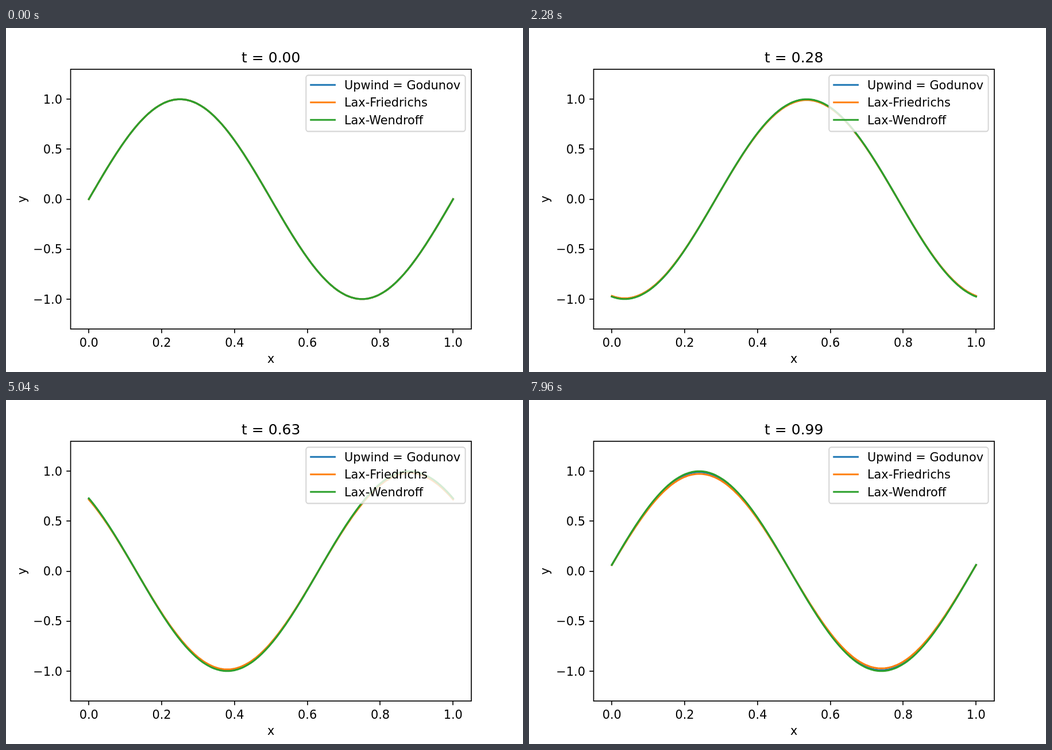
Write an HTML page with a canvas that moves like this. It is 900 px wide and 600 px high and loops after 8 s.

```html
<!DOCTYPE html>
<html lang="en">
<head>
<meta charset="utf-8">
<title>Advection schemes</title>
<style>
  html, body { margin: 0; width: 100%; height: 100%; overflow: hidden; background: #fff; }
  canvas { display: block; width: 900px; height: 600px; }
</style>
</head>
<body>
<canvas id="plot" width="900" height="600"></canvas>
<script>
const ctx = document.getElementById('plot').getContext('2d');
const LOOP = 8000, HOLD = 120, DT = 0.015;
const BOX = { left: 112.5, right: 810, top: 72, bottom: 525 };
const FONT = 20.83;

// Numerical diffusion damps each wave at its own rate.
const SCHEMES = [
  { name: 'Upwind = Godunov', color: '#1f77b4', damping: 0.0095 },
  { name: 'Lax-Friedrichs', color: '#ff7f0e', damping: 0.027 },
  { name: 'Lax-Wendroff', color: '#2ca02c', damping: 0 }
];

const px = x => BOX.left + (x + 0.05) / 1.1 * (BOX.right - BOX.left);
const py = y => BOX.bottom - (y + 1.3) / 2.6 * (BOX.bottom - BOX.top);

function text(str, x, y, align = 'center', size = FONT) {
  ctx.font = size + 'px "DejaVu Sans", sans-serif';
  ctx.textAlign = align;
  ctx.fillStyle = '#000';
  ctx.fillText(str, x, y);
}

function line(x1, y1, x2, y2) {
  ctx.beginPath();
  ctx.moveTo(x1, y1);
  ctx.lineTo(x2, y2);
  ctx.stroke();
}

function drawWave({ color, damping }, t) {
  const amp = Math.exp(-damping * t), n = 200;
  ctx.beginPath();
  for (let i = 0; i <= n; i++) {
    const x = i / n;
    ctx.lineTo(px(x), py(amp * Math.sin(2 * Math.PI * (x - t))));
  }
  ctx.strokeStyle = color;
  ctx.lineWidth = 3.125;
  ctx.lineCap = 'square';
  ctx.lineJoin = 'round';
  ctx.stroke();
}

function drawAxes() {
  ctx.strokeStyle = '#000';
  ctx.lineWidth = 1.667;
  ctx.lineCap = 'butt';
  ctx.lineJoin = 'miter';
  ctx.strokeRect(BOX.left, BOX.top, BOX.right - BOX.left, BOX.bottom - BOX.top);
  for (let i = 0; i <= 5; i++) {
    const x = Math.round(px(i / 5));
    line(x, BOX.bottom, x, BOX.bottom + 7.3);
    text((i / 5).toFixed(1), px(i / 5), 555.5);
  }
  for (let i = -2; i <= 2; i++) {
    const y = py(i / 2);
    line(BOX.left - 7.3, Math.round(y), BOX.left, Math.round(y));
    text((i / 2).toFixed(1).replace('-', '\u2212'), 97.9, y + 7.8, 'right');
  }
  text('x', 461.25, 584);
  ctx.save();
  ctx.translate(35, 298.5);
  ctx.rotate(-Math.PI / 2);
  text('y', 0, 0);
  ctx.restore();
}

function drawLegend() {
  ctx.beginPath();
  ctx.roundRect(522.3, 82.4, 277.3, 98, 4.2);
  ctx.fillStyle = 'rgba(255,255,255,0.8)';
  ctx.fill();
  ctx.strokeStyle = 'rgba(204,204,204,0.8)';
  ctx.lineWidth = 2.083;
  ctx.stroke();
  ctx.lineWidth = 3.125;
  ctx.lineCap = 'square';
  SCHEMES.forEach(({ name, color }, i) => {
    const y = 99.3 + i * 30.5;
    ctx.strokeStyle = color;
    line(530.8, y, 572.4, y);
    text(name, 589, y + 7.3, 'left');
  });
}

function frame(now) {
  const t = Math.floor((now % LOOP) / HOLD + 1e-6) * (DT * 1000) / 1000;
  ctx.fillStyle = '#fff';
  ctx.fillRect(0, 0, 900, 600);
  SCHEMES.forEach(s => drawWave(s, t));
  drawAxes();
  text('t = ' + t.toFixed(2), 461.25, 59.5, 'center', 25);
  drawLegend();
  requestAnimationFrame(() => frame(performance.now() - start));
}

const start = performance.now();
frame(0);
</script>
</body>
</html>
```
